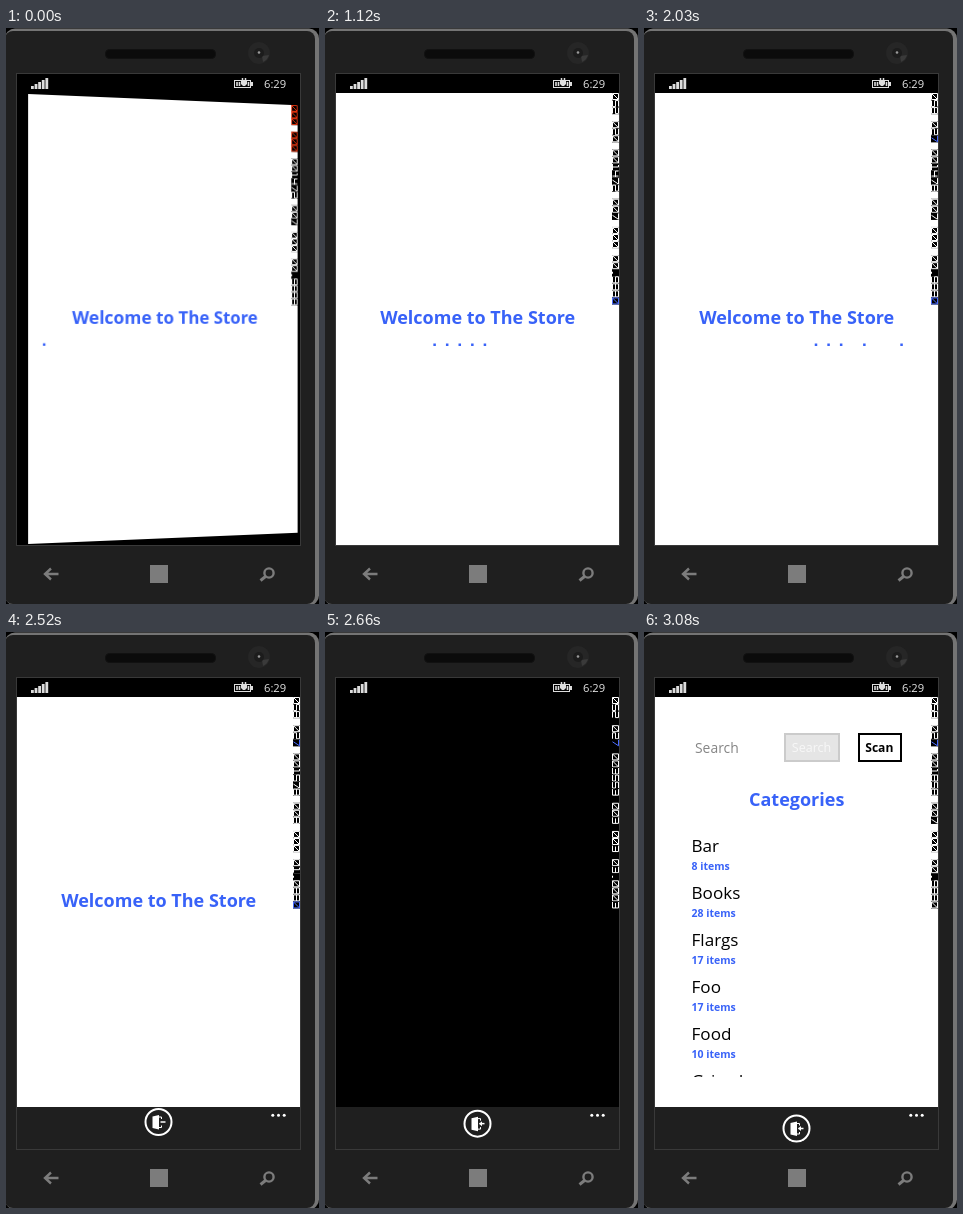
Write an HTML page that moves like this. It is 313 by 576 pixels and loops after 5950 ms.

```html
<!DOCTYPE html>
<html lang="en">
<head>
<meta charset="utf-8">
<title>Store app on a phone</title>
<style>
  html, body { margin: 0; width: 100%; height: 100%; overflow: hidden; background: #000; }
  #stage { position: relative; width: 313px; height: 576px; overflow: hidden; }
  svg { display: block; position: absolute; left: 0; top: 0; }
  text { font-family: "Open Sans", "Noto Sans", sans-serif; }
  #screen { position: absolute; left: 11px; top: 65px; width: 283px; height: 452px;
            overflow: hidden; background: #000; perspective: 1000px; }
  #page { position: absolute; inset: 0; transform-origin: 0 50%; }
  .title { font-size: 18px; font-weight: 700; fill: #3862f8; text-anchor: middle; }
  .name { font-size: 17.1px; fill: #000; }
  .count { font-size: 10.5px; font-weight: 700; fill: #3862f8; }
  .mid { text-anchor: middle; }
</style>
</head>
<body>
<div id="stage">
  <svg width="313" height="576">
    <rect x="-1" y="0.5" width="314" height="577" rx="10" fill="#747474"/>
    <rect x="-1" y="3" width="310" height="573" rx="8" fill="#1f1f1f"/>
    <rect x="99.5" y="21.5" width="110" height="9" rx="4" fill="#0b0b0b" stroke="#111"/>
    <circle cx="253" cy="25" r="11" fill="#262626"/>
    <path d="M256 28L263 27A10 10 0 0 1 257 34Z" fill="#3a3a3a"/>
    <circle cx="253" cy="25" r="5" fill="#1c1c1c"/>
    <circle cx="253" cy="24.5" r="1.3" fill="#999"/>
    <rect x="10.5" y="45.5" width="284" height="472" fill="#000" stroke="#393939"/>
    <g fill="#ddd" id="signal"></g>
    <g fill="none" stroke="#ddd">
      <rect x="228.5" y="52.5" width="16" height="7"/>
      <path d="M246 54v4" stroke-width="2"/>
      <path d="M231 54v4M233.5 54v4M242.5 54v4" stroke-width="1.6"/>
      <path d="M236.500 50v3M239.500 50v3" stroke-width="1.5"/>
      <path d="M235 53h6v3l-2 2h-2l-2 -2Z" fill="#ddd" stroke="none"/>
    </g>
    <text x="258" y="60" font-size="11.2" fill="#e4e4e4">6:29</text>
    <g fill="none" stroke="#7c7c7c" stroke-width="2.4">
      <path d="M52.500 546H39.500M45 540.500L39 546L45 551.500"/>
      <circle cx="263" cy="545" r="4.600"/>
      <path d="M259.500 548.500L254.500 552.500" stroke-width="3"/>
    </g>
    <rect x="144" y="537" width="18" height="18" fill="#7c7c7c"/>
  </svg>

  <div id="screen">
    <div id="page">
      <svg width="283" height="452" viewBox="11 65 283 452">
        <rect id="paper" x="11" y="65" width="283" height="452" fill="#fff"/>
        <g id="welcome">
          <text id="hello" class="title" x="152.7" y="296">Welcome to The Store</text>
          <g id="dots" fill="#3862f8"></g>
        </g>
        <g id="catalog">
          <text x="51" y="121" font-size="13.9" fill="#858585">Search</text>
          <rect x="141" y="102" width="54" height="27" fill="#e5e5e5" stroke="#cbcbcb" stroke-width="2"/>
          <text class="mid" x="167.500" y="120" font-size="12.5" fill="#f7f7f7">Search</text>
          <rect x="215" y="102" width="42" height="27" fill="#fff" stroke="#000" stroke-width="2"/>
          <text class="mid" x="235.300" y="120" font-size="12.1" font-weight="700">Scan</text>
          <text class="title" x="152.700" y="174">Categories</text>
          <clipPath id="cut"><rect x="11" y="190" width="283" height="255"/></clipPath>
          <g id="list" clip-path="url(#cut)"></g>
        </g>
        <g id="meter" transform="translate(294 65) rotate(90)"></g>
      </svg>
    </div>
    <svg width="283" height="452" viewBox="11 65 283 452">
      <g id="bar">
        <rect x="11" y="475" width="283" height="42" fill="#1f1f1f"/>
        <g id="exit">
          <circle cx="152.500" cy="490" r="13" fill="none" stroke="#fff" stroke-width="2"/>
          <path d="M146.500 484.500L153 483V497.500L146.500 496Z" fill="#fff"/>
          <path d="M153 485h2.500v2M153 495.500h2.500v-2" fill="none" stroke="#fff"/>
          <path d="M154.500 490h5" stroke="#fff" stroke-width="1.5"/>
          <path id="arrow" d="M157 487.500L154 490L157 492.500Z" fill="#fff"/>
        </g>
        <g fill="#fff">
          <circle cx="266.800" cy="483.300" r="1.500"/>
          <circle cx="272.500" cy="483.300" r="1.500"/>
          <circle cx="278.200" cy="483.300" r="1.500"/>
        </g>
      </g>
    </svg>
  </div>
</div>

<script>
const LOOP = 5950, STEP = 70;
const BAR = 2380, DOCKED = 2520, OUT = 2590, DARK = 2660, END = 3080;
const $ = id => document.getElementById(id);

function add(parent, tag, attrs, text) {
  const el = document.createElementNS("http://www.w3.org/2000/svg", tag);
  for (const k in attrs) el.setAttribute(k, attrs[k]);
  if (text) el.textContent = text;
  parent.appendChild(el);
  return el;
}
const show = (el, on) => { el.style.display = on ? "" : "none"; };
const clamp = v => Math.min(1, Math.max(0, v));

for (let i = 0; i < 5; i++) {
  const h = 3 + 2 * i;
  add($("signal"), "rect", { x: 25 + 3.6 * i, y: 61 - h, width: 2.8, height: h });
}

const items = [["Bar", 8], ["Books", 28], ["Flargs", 17], ["Foo", 17], ["Food", 10], ["Grizad", 6]];
items.forEach(([name, n], i) => {
  add($("list"), "text", { class: "name", x: 47.5, y: 220 + 47 * i }, name);
  add($("list"), "text", { class: "count", x: 47.5, y: 238 + 47 * i }, n + " items");
});

const dots = Array.from({ length: 5 }, () =>
  add($("dots"), "rect", { y: 315.5, width: 2.5, height: 2.5 }));

// Performance read-out: boxy digits, one cell every 7.05 px
const glyphs = {
  0: "M0 0H6V6H0ZM0 6L6 0", 1: "M1 0H3V6M0 6H6", 2: "M0 0H6V3H0V6H6",
  3: "M0 0H6V6H0M1 3H6", 4: "M0 0V3H6M5 0V6", 5: "M6 0H0V3H6V6H0",
  6: "M6 0H0V6H6V3H0", 7: "M0 0H6L2 6", 8: "M0 0H6V6H0ZM0 3H6",
  9: "M6 3H0V0H6V6H0", ".": "M2 6H4"
};
const readings = [
  [0, "000 000 001472 007 000 00.9888"],
  [350, "003 002 001472 007 000 00.9880"],
  [700, "052 020 001472 007 000 00.9880"],
  [1330, "058 027 001472 007 000 00.9880"],
  [1960, "058 027 001478 007 000 00.9880"],
  [2310, "058 027 001578 008 000 01.0880"],
  [OUT, "052 027 003553 003 003 03.0003"],
  [END, "058 027 001858 007 000 00.9880"]
];
const cells = [...readings[0][1]].map((c, i) => {
  if (c === " ") return null;
  const g = add($("meter"), "g", { transform: `translate(${7.05 * i} 0)` });
  add(g, "rect", { width: 7.1, height: 7 });
  return add(g, "path", { transform: "translate(.5 .5)", fill: "none" });
});

function drawMeter(t) {
  const text = readings.filter(r => r[0] <= t).pop()[1];
  cells.forEach((cell, i) => {
    if (!cell) return;
    const red = t < 700 && i < 7;
    const blue = (i === 29 && t > 600 && t < OUT) || (i === 6 && t >= 1330);
    cell.setAttribute("d", glyphs[text[i]]);
    cell.setAttribute("stroke", red ? "#e8320c" : blue ? "#4a6cff" : "#fff");
  });
}

// Dots rush in, drift through the middle third, rush out (seconds -> 0..1)
function drift(s) {
  if (s < 0.5) return (1 - (Math.exp(1 - s / 0.5) - 1) / (Math.E - 1)) / 3;
  if (s < 2) return (1 + (s - 0.5) / 1.5) / 3;
  return (2 + (Math.exp((s - 2) / 0.5) - 1) / (Math.E - 1)) / 3;
}
const clock = [[0, 0.057], [630, 0.83], [1120, 1.368], [2030, 2.36], [2600, 2.98]];
function dotTime(t) {
  let i = 0;
  while (i < clock.length - 2 && t > clock[i + 1][0]) i++;
  const [t0, a] = clock[i], [t1, b] = clock[i + 1];
  return a + (b - a) * (t - t0) / (t1 - t0);
}
function drawDots(t) {
  const lead = dotTime(t);
  dots.forEach((dot, i) => {
    const s = lead - 0.2 * i;
    show(dot, s >= 0 && s <= 2.5);
    dot.setAttribute("x", 9.75 + 283 * drift(s));
  });
}

// Share of the turnstile swing still to go
const left = u => u >= 1 ? 0 : (Math.exp(6 * (1 - u)) - 1) / (Math.exp(6) - 1);
function swing(t) {
  if (t < OUT) return 80 * left(0.332 + t / 320);
  if (t < DARK) return -18;
  if (t < DARK + STEP) return 0;
  return 80 * left((t - DARK) / 320);
}

function drawBar(t) {
  const rest = 1 - clamp((t - BAR + STEP) / (DOCKED - BAR + STEP));
  show($("bar"), t >= BAR);
  show($("arrow"), t >= OUT);
  $("bar").setAttribute("transform", `translate(0 ${42 * rest * rest})`);
  const sink = 6.5 * clamp((t - DOCKED) / (END - DOCKED));
  $("exit").setAttribute("transform", `translate(0 ${sink})`);
}

function draw(time) {
  const t = Math.floor((time % LOOP) / STEP) * STEP;
  const angle = swing(t), k = Math.max(angle, 0) / 10.7;
  $("page").style.transform = angle
    ? `translate3d(${10.5 * k}px,0,${-4.4 * k}px) rotateY(${angle}deg)` : "none";

  const dark = t >= DARK && t < DARK + STEP, docked = t >= BAR;
  show($("paper"), !dark);
  show($("welcome"), t < DARK);
  show($("catalog"), t >= DARK + STEP);
  show($("dots"), !docked);
  $("paper").setAttribute("height", docked ? 410 : 452);
  $("hello").setAttribute("y", docked ? 275 : 296);

  drawDots(t);
  drawBar(t);
  drawMeter(t);
}

let start;
function tick(now) {
  if (start === undefined) start = now;
  draw(now - start);
  requestAnimationFrame(tick);
}
draw(0);
requestAnimationFrame(tick);
</script>
</body>
</html>
```
